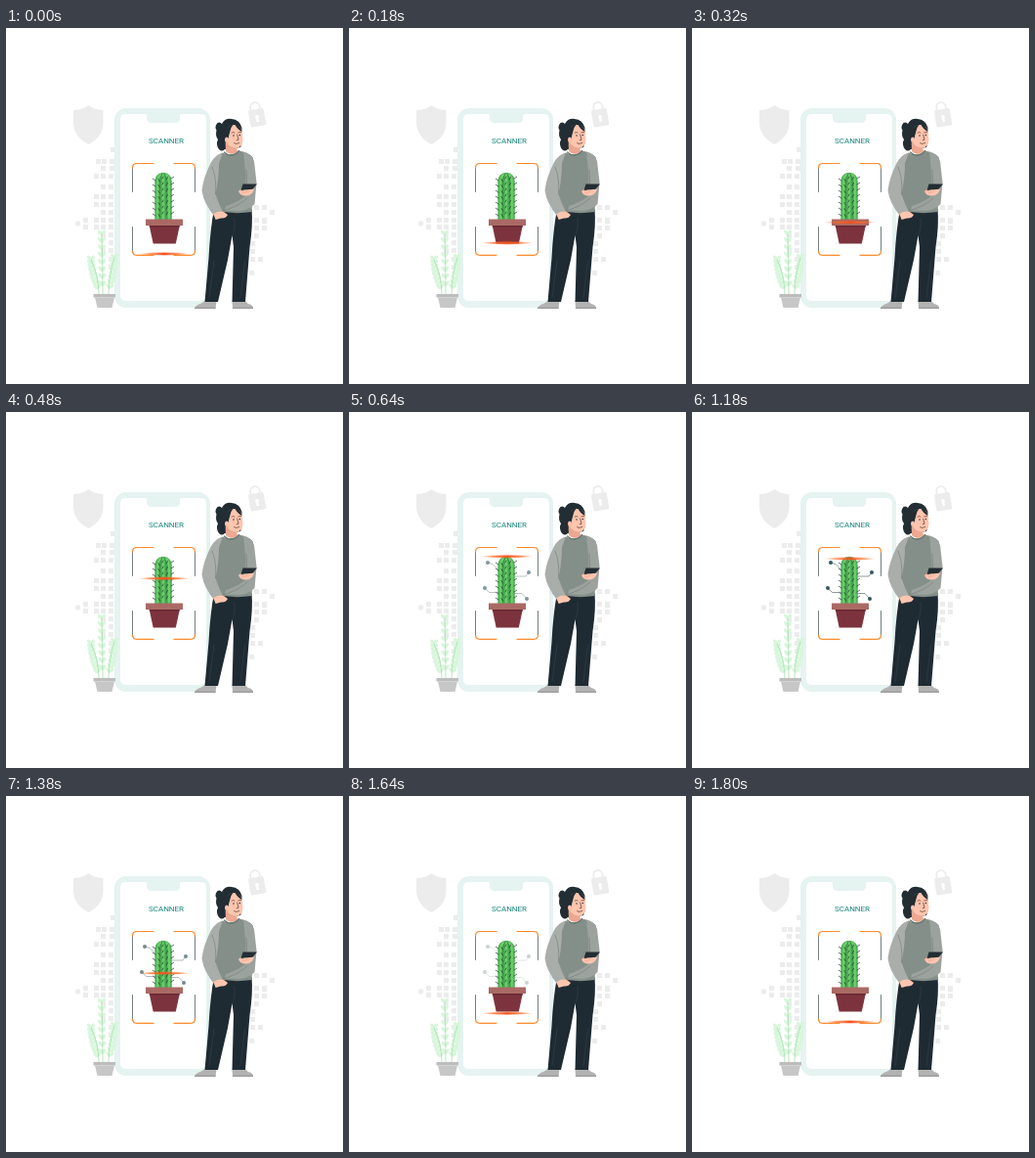
Recreate the animation shown at these times as an HTML page. Size 345x364 px, loop 1820 ms.

```html
<!DOCTYPE html>
<html lang="en">
<head>
<meta charset="utf-8">
<title>Plant scanner</title>
<style>
html, body { margin: 0; width: 100%; height: 100%; overflow: hidden; background: #fff; }
svg { display: block; width: 100vw; height: 100vh; }
.round { fill: none; stroke-linecap: round; stroke-linejoin: round; }
</style>
</head>
<body>
<svg viewBox="0 0 345 364">
  <defs>
    <linearGradient id="beam">
      <stop offset="0" stop-color="#ff6a22" stop-opacity="0"/>
      <stop offset=".25" stop-color="#ff6a22" stop-opacity=".7"/>
      <stop offset=".5" stop-color="#f4511e"/>
      <stop offset=".75" stop-color="#ff6a22" stop-opacity=".7"/>
      <stop offset="1" stop-color="#ff6a22" stop-opacity="0"/>
    </linearGradient>
  </defs>

  <!-- backdrop -->
  <g fill="#ececec">
    <path d="M84.500 79C89 82.500 94 84 99.500 84V97C99.500 107 93 115 84.500 119C76 115 69 107 69 97V84C75 84 80 82.500 84.500 79Z"/>
    <g id="tiles"></g>
    <g transform="rotate(-10 257 91)">
      <path class="round" d="M252 84V80.500A4.700 4.700 0 0 1 261.400 80.500V84" stroke="#ececec" stroke-width="1.700"/>
      <rect x="249" y="83" width="16" height="17.500" rx="1.500"/>
      <path d="M257 89a1.900 1.900 0 0 1 1 3.500l.5 3.500h-3l.5-3.500a1.900 1.900 0 0 1 1-3.500z" fill="#fff"/>
    </g>
  </g>

  <!-- handset -->
  <rect x="111" y="82" width="98" height="204" rx="12" fill="#e5f3f1"/>
  <path d="M122 88H142Q144 88 144 90V92Q144 97 149 97H173Q178 97 178 92V90Q178 88 180 88H200Q205 88 205 94V273Q205 279 199 279H123Q117 279 117 273V94Q117 88 122 88Z" fill="#fff"/>
  <text x="164" y="118" text-anchor="middle" font-family="Roboto, sans-serif" font-size="8" fill="#17857b">SCANNER</text>

  <!-- potted fern -->
  <g id="fern"></g>
  <path d="M89.500 272H112V275.500H89.500Z" fill="#bdbdbd"/>
  <path d="M91 275.500H111L108.500 286H93.500Z" fill="#c7c7c7"/>

  <!-- cactus -->
  <path d="M152.300 196V157Q152.500 148.500 161 147.800Q169.500 148.500 169.800 157V196Z" fill="#4fb554"/>
  <path class="round" d="M155.200 195V157Q155.500 152 158 150M160.900 195V149.500M166.800 195V157Q166.500 152 164 150" stroke="#72cd70" stroke-width="1.900"/>
  <path class="round" d="M157.800 195V157Q158 152 160 149M164.200 195V157Q164 152 162 149" stroke="#2f8740" stroke-width=".8"/>
  <g id="spines" class="round" stroke="#263f35" stroke-width=".75"></g>
  <path d="M146.500 201H178L173.800 220.500H150.700Z" fill="#7d333d"/>
  <path d="M146.500 201H178L177.600 203.500H147Z" fill="#692832"/>
  <path d="M143 195.500H181V202H143Z" fill="#aa6964"/>

  <!-- data points -->
  <g id="nodes" opacity="0">
    <path class="round" d="M142 154L147 155.500L152.500 161M184 164L181 168H170M139 180L143.500 184.500H154M182 191L177 185.500H168" stroke="#71858a" stroke-width=".8"/>
    <g fill="#365860">
      <circle cx="142" cy="154" r="2"/><circle cx="184" cy="164" r="2"/>
      <circle cx="139" cy="180" r="2"/><circle cx="182" cy="191" r="2"/>
    </g>
  </g>

  <!-- viewfinder -->
  <path class="round" d="M129.500 143V167.500M193.500 143V167.500M129.500 203.500V228M193.500 203.500V228" stroke="#65706f" stroke-width=".9"/>
  <path class="round" d="M129.500 143Q129.500 138.500 134 138.500H151M172 138.500H189Q193.500 138.500 193.500 143M129.500 228Q129.500 232.300 134 232.300H151M172 232.300H189Q193.500 232.300 193.500 228" stroke="#ff8a2b" stroke-width="1.200"/>

  <g id="scan" transform="translate(0 231)" fill="url(#beam)">
    <path d="M134 0Q162 -4 190 0Q162 4 190 0Q162 3.500 134 0Z" opacity=".4"/>
    <path d="M134 0Q162 -1.900 190 0Q162 1.900 134 0Z"/>
  </g>

  <!-- man -->
  <g>
    <path d="M193 286.500Q194 283.500 199 282L204 279H215.500L214.500 287H193Z" fill="#b3b3b3"/>
    <path d="M231.500 279H244.500Q247 282 251 283Q253.500 284.500 253 287H232Z" fill="#b3b3b3"/>
    <path d="M193 286.300H214.500M232 286.300H253" stroke="#929292" stroke-width="1"/>
    <path d="M213 185H251.500Q253 201 249.500 224L245 280H231.500L233 224L231.500 212L227 237L217 280H203.500L207.500 235Q209 206 213 185Z" fill="#1f2b33"/>
    <path class="round" d="M232 212Q235 204 234 194M244.500 238L240 276M213 238L208 276" stroke="#34424a" stroke-width=".6"/>

    <path d="M216.500 97Q213 101 215.500 104.500Q214 110 217 114Q214.500 119 218 124Q221 127 224 124L240 122Q242.500 117 241 110L241.500 102Q239 93.500 231 93Q224 92 221 98Q219 95.500 216.500 97Z" fill="#222d34"/>
    <path d="M224.500 114L225 126Q231 132 237 126L235.500 119Z" fill="#eca890"/>
    <path d="M225.500 106Q228 98 234 99Q241 99 241.800 107L242.500 114Q242 122.500 235.500 122.500Q226.500 122 225.500 114Z" fill="#ffc5ae"/>
    <path d="M224 113Q223.500 101 233 98Q229.500 102 229 107Q228 110 227.500 114Z" fill="#222d34"/>
    <path d="M234 98Q240 98.500 241.500 106Q237 104 234 98Z" fill="#222d34"/>
    <ellipse cx="226" cy="114" rx="2" ry="2.600" fill="#ffc5ae"/>
    <path class="round" d="M231 107.200Q232.500 105.800 234 107M237.800 106.900L240.500 106.600M236.700 109L238 114.300L236.300 114.700M233.500 117.800Q236 119.500 238.800 117.500" stroke="#57372f" stroke-width=".7"/>
    <circle cx="233" cy="110" r=".75" fill="#222d34"/><circle cx="239.300" cy="109.600" r=".75" fill="#222d34"/>

    <path d="M222 127.500Q231 132 239 125.500Q249 128 252.500 132Q255 144 253 158L251.500 188Q231 191 212 186L211 139Q214 130 222 127.500Z" fill="#858f89"/>
    <path d="M222 127.500Q214 129.500 209.500 138Q202 153 200.500 166Q202 179 214 193.500L222 188Q217 178 214.500 170Q218 153 218 138Z" fill="#aaaeab"/>
    <path d="M243 126.500Q251.500 128 254 136L256.500 158L254.500 180Q249 186 239 187L224 186.500L225 182Q238 178 246 171L245 147Z" fill="#9ca29d"/>
    <path d="M223.500 127Q231 134 238.500 125.500" class="round" stroke="#69736f" stroke-width="1.200"/>
    <path class="round" d="M211 142Q216 154 214.500 170M246 145L247 168M222 187Q237 183 247 174" stroke="#747f79" stroke-width=".6"/>
    <path d="M212.500 190Q218 186.500 223 188L227 191Q225 195 220 194.500L214.500 196Z" fill="#ffc5ae"/>
    <path d="M238 167Q243 162.500 250 163L254 165Q252 171 246 171.500Q240 172 238 167Z" fill="#ffc5ae"/>
    <path d="M242.500 159.500L257 159.500L252.500 164.800L240.500 166Z" fill="#222d34"/>
    <path class="round" d="M240.500 167L246 165.500M241.500 169L247 167.500" stroke="#e99f87" stroke-width=".6"/>
  </g>
</svg>
<script>
const $ = id => document.getElementById(id);
const LOOP = 1820, TOP = 140, BOTTOM = 231;

// Each row: y, then the left edges of its squares.
const rows = [
  [122, 107], [134, 92, 98, 106], [141, 97, 106], [149, 90, 97, 105],
  [160, 97, 105], [170, 90, 97, 105], [178, 90, 97, 105], [186, 97, 105],
  [194, 79, 90, 97, 105], [201, 79, 90, 97, 105], [209, 97, 105], [217, 105],
  [225, 97, 105], [234, 105], [242, 105],
  [181, 254, 262], [186, 270], [194, 254, 262], [202, 254, 262], [210, 254],
  [218, 250], [226, 250], [234, 250, 258], [248, 249]
];
$("tiles").innerHTML = rows.map(([y, ...xs]) =>
  xs.map(x => `<rect x="${x}" y="${y}" width="5" height="5"/>`).join("")).join("") +
  '<circle cx="73.500" cy="200" r="2.700"/><circle cx="264.500" cy="198" r="2.700"/>';

const stems = [[98, 211, 99], [87, 237, 95], [111, 235, 105]];
$("fern").innerHTML = stems.map(([x, y, base]) => {
  const leaves = [];
  for (let i = 0; i < 8; i++) {
    const k = i / 8;
    const cx = x + (base - x) * k * k, cy = y + (270 - y) * k;
    for (const s of [-1, 1])
      leaves.push(`<ellipse cx="${cx + s * 2.2}" cy="${cy}" rx="3.200" ry="1.700" transform="rotate(${-s * 48} ${cx} ${cy})"/>`);
  }
  return `<g fill="#d9f6dc">${leaves.join("")}</g>` +
    `<path class="round" d="M${x} ${y}Q${base} ${(y + 270) / 2} ${base} 272" stroke="#a4dfac" stroke-width=".8"/>`;
}).join("");

let spines = "";
for (let i = 0; i < 7; i++) {
  const y = 154 + i * 6;
  spines += `M153 ${y + 2}l-2.700 -1.800M169 ${y}l2.700 -1.800`;
  spines += `M157.500 ${y + 3}l-1.500 -2.500M164 ${y + 1}l1.500 -2.500M161 ${y - 2}l-1 2`;
}
$("spines").innerHTML = `<path d="${spines}"/>`;

const ramp = (t, a, b) => Math.min(1, Math.max(0, (t - a) / (b - a)));
const ease = p => (1 - Math.cos(Math.PI * p)) / 2;

function draw(t) {
  const lift = ease(ramp(t, 0, 790)) - ease(ramp(t, 1010, 1800));
  $("scan").setAttribute("transform", `translate(0 ${BOTTOM + (TOP - BOTTOM) * lift})`);
  $("nodes").setAttribute("opacity", ramp(t, 480, 740) - ramp(t, 1190, 1800));
}

const start = performance.now();
function tick() {
  draw((performance.now() - start) % LOOP);
  requestAnimationFrame(tick);
}
draw(0);
requestAnimationFrame(tick);
</script>
</body>
</html>
```
